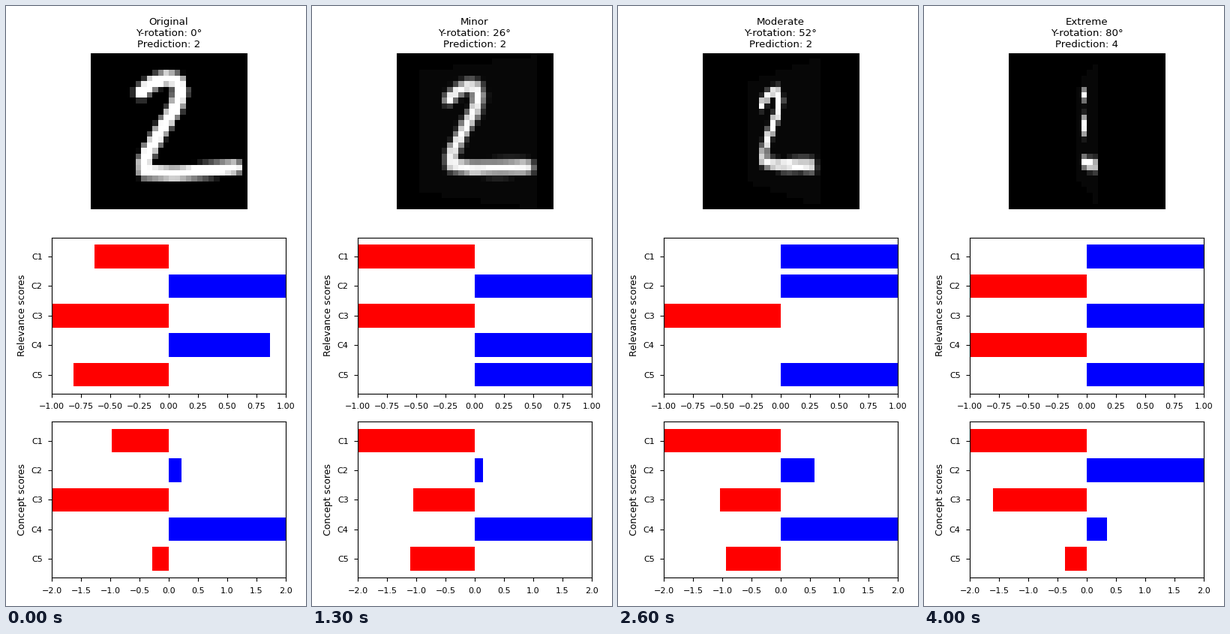
Animation, 400 px wide and 800 px high, one loop 4.1 s. Source, as a matplotlib script:

```python
import matplotlib.pyplot as plt
import numpy as np
from matplotlib.animation import FuncAnimation

W, H, N, STEP = 400, 800, 28, 2
FRAMES = 41
MID = (N - 1) / 2
NAMES = ["C1", "C2", "C3", "C4", "C5"]

# Pen path of the digit as (column, row)
STROKE = [(8.5, 6.5), (10.6, 4.7), (13.2, 3.9), (15, 4.4), (15.6, 6.4),
          (14.8, 9), (12.9, 12), (9.8, 17.1), (9.0, 19.2), (9.1, 20.7),
          (14.5, 21.1), (19.5, 20.6), (25.2, 20)]
PEN = 1.25


def draw_digit():
    rows, cols = np.mgrid[:N, :N].astype(float)
    dist = np.full((N, N), float(N))
    for (x0, y0), (x1, y1) in zip(STROKE[:-1], STROKE[1:]):
        dx, dy = x1 - x0, y1 - y0
        t = ((cols - x0) * dx + (rows - y0) * dy) / (dx * dx + dy * dy)
        t = np.clip(t, 0, 1)
        dist = np.minimum(dist, np.hypot(cols - x0 - t * dx, rows - y0 - t * dy))
    return np.clip(PEN + .5 - dist, 0, 1)


def sample(img, x, y):
    """Bilinear lookup, zero outside the image."""
    pad = np.pad(img, 2)
    x = np.clip(x + 2, 0, N + 2)
    y = np.clip(y + 2, 0, N + 2)
    j, i = x.astype(int), y.astype(int)
    fx, fy = x - j, y - i
    top = pad[i, j] * (1 - fx) + pad[i, j + 1] * fx
    low = pad[i + 1, j] * (1 - fx) + pad[i + 1, j + 1] * fx
    return top * (1 - fy) + low * fy


def rotate(img, deg):
    """Turn the image about its vertical axis, left side moving away."""
    if deg == 0:
        return img
    a = np.radians(deg)
    s, c = np.sin(a), np.cos(a)
    focal, push = 41.4, .41 * s ** 1.15
    v, u = np.mgrid[:N, :N].astype(float)
    u -= MID - 1.3 * np.sin(2 * a)
    v -= MID + .2 * s
    den = np.maximum(c + u * s / focal, .02)
    x = u * (1 + push) / den
    y = v * (1 + push - s * x / focal)
    inside = (x > -13) & (x < MID) & (abs(y) < 14)
    ink = sample(img, x + MID, y + MID)
    ink = ink / ink[inside].max()
    return np.where(inside, .03 + .97 * ink, 0)


def relevance_scores(k):
    """Each score grows and then swings over to the other sign."""
    start = np.array([-.635, 1.3, -1.3, .87, -.815])
    flip = np.array([14, 32, 32, 26, 11.4])
    return (start + np.sign(start) * .15 * k) * np.tanh((flip - k) / 2)


def concept_scores(k):
    late = np.clip((k - 23) / 12, 0, 1)
    return [-.975 - .2 * k,
            np.interp(k, [0, 10, 17, 23, 35], [.22, .27, -.04, .08, 2.1]),
            -1 - 1.2 * np.exp(-k / 4) - .6 * late ** 2,
            .35 + .55 * (FRAMES - 1 - k),
            np.interp(k, [0, 10, 29, 40], [-.28, -1.14, -.9, -.37])]


def add_axes(left, top, width, height):
    return fig.add_axes([left / W, 1 - (top + height) / H, width / W, height / H])


def add_bars(top, limit, label):
    ax = add_axes(61.1, top, 311.6, 208)
    bars = ax.barh(range(5), np.ones(5), height=.8)
    ax.set_xlim(-limit, limit)
    ax.set_ylim(4.64, -.64)
    ax.set_xticks(np.linspace(-limit, limit, 9))
    ax.set_yticks(range(5), NAMES)
    ax.tick_params(labelsize=8, pad=5.46)
    fig.text(21.4 / W, 1 - (top + 104) / H, label, fontsize=9,
             rotation=90, ha="center", va="center")
    return bars


def set_bars(bars, values):
    for bar, value in zip(bars, values):
        bar.set_width(value)
        bar.set_facecolor("blue" if value >= 0 else "red")


def level(deg):
    if deg == 0:
        return "Original"
    return "Minor" if deg <= 30 else "Moderate" if deg <= 60 else "Extreme"


def update(k):
    deg = k * STEP
    guess = 2 if deg < 64 else 0 if deg < 76 else 4
    picture.set_data(rotate(digit, deg))
    title.set_text(f"{level(deg)}\nY-rotation: {deg}°\nPrediction: {guess}")
    set_bars(relevance, relevance_scores(k))
    set_bars(concept, concept_scores(k))


plt.rcParams["font.family"] = "DejaVu Sans"
fig = plt.figure(figsize=(W / 100, H / 100), dpi=100, facecolor="white")
digit = draw_digit()

ax_img = add_axes(112.9, 63, 208, 208)
ax_img.axis("off")
picture = ax_img.imshow(digit, cmap="gray", vmin=0, vmax=1, interpolation="nearest")
title = ax_img.set_title("", fontsize=9.6, pad=5.5)

relevance = add_bars(308.8, 1, "Relevance scores")
concept = add_bars(554.3, 2, "Concept scores")

anim = FuncAnimation(fig, update, frames=FRAMES, interval=100, repeat=True,
                     repeat_delay=0, init_func=lambda: update(0))
plt.show()
```
